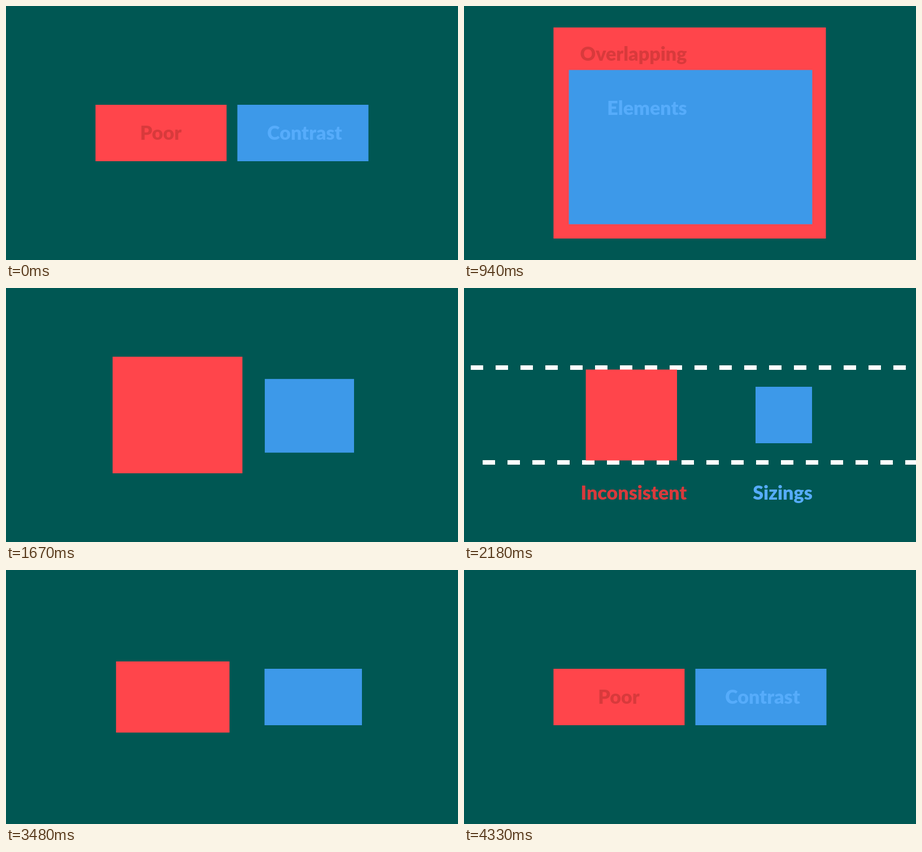
Write an HTML page with a canvas that moves like this. It is 800 px wide and 450 px high and loops after 4670 ms.

```html
<!DOCTYPE html>
<html lang="en">
<head>
<meta charset="utf-8">
<style>
  html, body { margin: 0; width: 100%; height: 100%; overflow: hidden; background: #005753; }
  canvas { display: block; }
</style>
</head>
<body>
<canvas width="800" height="450"></canvas>
<script>
const LOOP = 4670;
const BACKGROUND = '#005753';
const PARTS = [
  { name: 'red', fill: '#ff454b', ink: '#d83a3c', delay: 0 },
  { name: 'blue', fill: '#3d99e9', ink: '#56acfb', delay: 15 },
];

// Boxes are placed by left edge x and vertical centre y; "at" is the centre of the word.
// "hold" is how long after its start a scene keeps its words.
const SCENES = [
  { start: 0, hold: 1060, lag: 0,
    red: { x: 158.4, y: 225, w: 484, h: 376, time: 1080, word: 'Overlapping', at: 300, base: 90 },
    blue: { x: 182, y: 250, w: 434, h: 276, time: 1130, word: 'Elements', at: 324, base: 186 } },
  { start: 1129, hold: 1500, lag: 171,
    red: { x: 217.4, y: 225, w: 160, h: 160, time: 1170, word: 'Inconsistent', at: 300.5, base: 373 },
    blue: { x: 516, y: 225, w: 100, h: 100, time: 1050, word: 'Sizings', at: 564, base: 373 } },
  { start: 3086, hold: 1600, lag: 73,
    red: { x: 158.4, y: 225, w: 232, h: 100, time: 1170, word: 'Poor', at: 274, base: 237 },
    blue: { x: 409.5, y: 225, w: 232, h: 100, time: 1150, word: 'Contrast', at: 528.5, base: 237 } },
];

// cubic-bezier(.4, 0, .1, 1), solved by bisection
function ease(x) {
  if (x <= 0) return 0;
  if (x >= 1) return 1;
  let lo = 0, hi = 1;
  for (let i = 0; i < 24; i++) {
    const u = (lo + hi) / 2, v = 1 - u;
    if (1.2 * u * v * v + 0.3 * u * u * v + u ** 3 < x) lo = u; else hi = u;
  }
  return lo * lo * (3 - 2 * lo);
}

function drawBox(t, { name, fill, delay }) {
  const box = { ...SCENES[2][name] };
  for (const scene of SCENES) {
    const goal = scene[name];
    const age = t - scene.start - delay;
    const move = (key, lag, time) => box[key] += (goal[key] - box[key]) * ease((age - lag) / time);
    move('x', name === 'red' ? scene.lag : 0, goal.time);
    move('y', scene.lag, goal.time / 2);
    move('w', 0, goal.time);
    move('h', 0, goal.time);
  }
  ctx.fillStyle = fill;
  ctx.fillRect(box.x, box.y - box.h / 2, box.w, box.h);
}

// A word rises into a masked line and later leaves through its top
function drawWord(t, scene, { name, ink, delay }) {
  const { word, at, base } = scene[name];
  const age = (t - scene.start + LOOP) % LOOP;
  const rise = ease((age - 600) / 640) + ease((age - scene.hold + 2 * delay) / 480);
  ctx.save();
  ctx.beginPath();
  ctx.rect(0, base - 31, 800, 46);
  ctx.clip();
  ctx.fillStyle = ink;
  ctx.fillText(word, at, base + 46 * (1 - rise));
  ctx.restore();
}

// A dashed line crosses from right to left, pausing in the middle
function drawDashes(t, y, enter, leave) {
  const shift = 880 * (1 - ease((t - enter) / 700) - ease((t - leave) / 700));
  ctx.fillStyle = '#fff';
  for (let x = 778; x > -44; x -= 44) ctx.fillRect(x + shift, y, 22, 8);
}

function draw(t) {
  ctx.fillStyle = BACKGROUND;
  ctx.fillRect(0, 0, 800, 450);
  drawDashes(t, 137, 1650, 2200);
  drawDashes(t, 305, 1700, 2298);
  for (const part of PARTS) drawBox(t, part);
  for (const scene of SCENES)
    for (const part of PARTS) drawWord(t, scene, part);
}

const ctx = document.querySelector('canvas').getContext('2d');
ctx.font = '900 34px Lato, sans-serif';
ctx.textAlign = 'center';
const begin = performance.now();
function tick() {
  draw((performance.now() - begin) % LOOP);
  requestAnimationFrame(tick);
}
tick();
</script>
</body>
</html>
```
